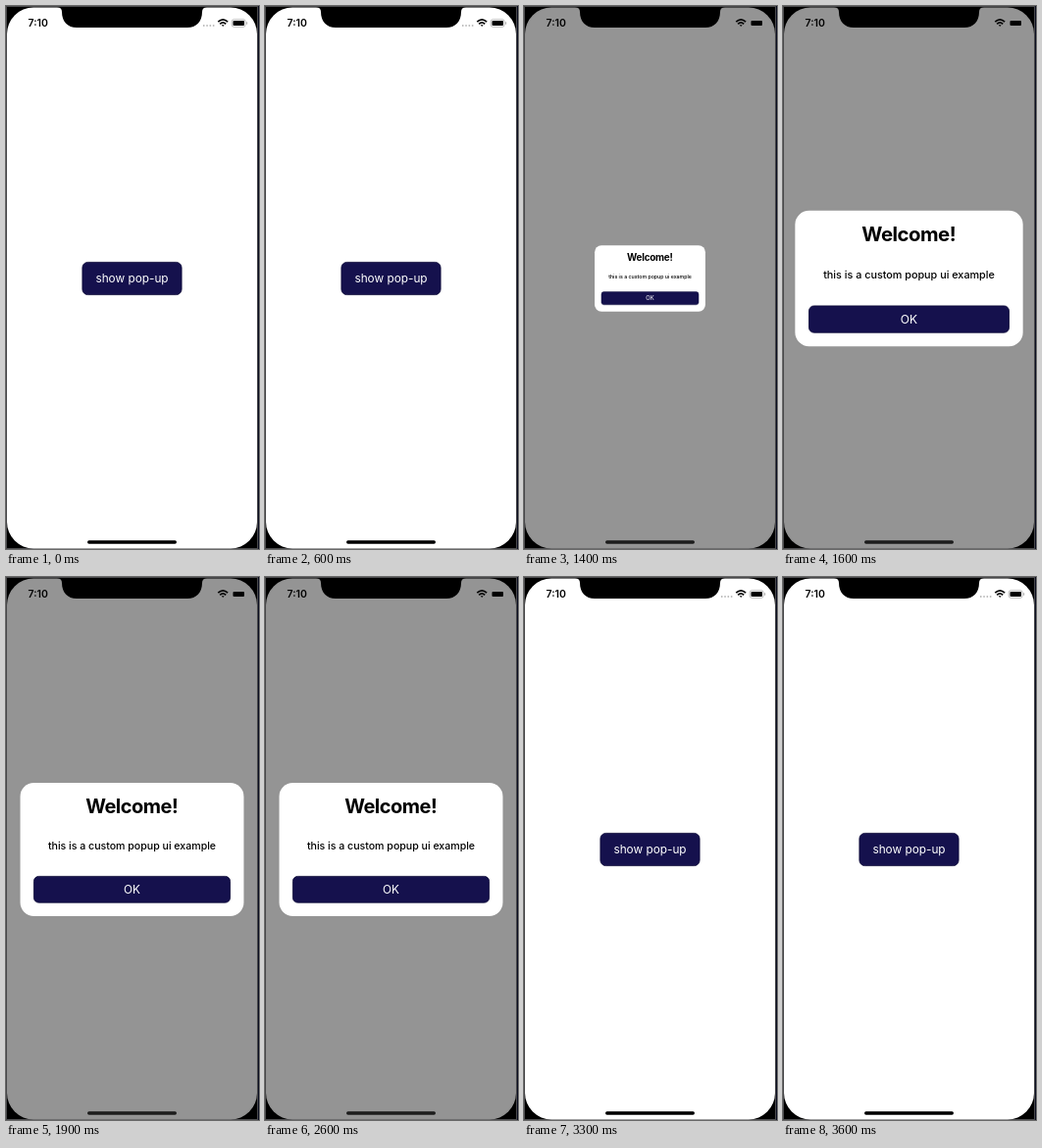
Animation, 258 px wide and 554 px high, one loop 4000 ms. Source, as an HTML page:

```html
<!DOCTYPE html>
<html lang="en">
<head>
<meta charset="utf-8">
<title>Pop-up demo</title>
<style>
  html, body { margin: 0; width: 100%; height: 100%; overflow: hidden; background: #000; }
  svg { display: block; width: 100%; height: 100%; }
  text { font-family: Inter, "Noto Sans", sans-serif; text-anchor: middle; }
  .button { fill: #15114d; stroke: #0b0835; stroke-width: .8; }
  .label { fill: #fff; font-size: 11.8px; }
</style>
</head>
<body>
<svg viewBox="0 0 258 554">
  <!-- device frame and screen -->
  <rect width="258" height="554" fill="#0a0d20"/>
  <rect x=".5" y=".5" width="256" height="553" fill="#000" stroke="#4a4a4c"/>
  <rect id="screen" x="1" y="1.5" width="255" height="552" rx="27"/>

  <g id="home">
    <rect class="button" x="77.9" y="261.4" width="101.2" height="33.2" rx="5.5"/>
    <text class="label" x="128.5" y="282">show pop-up</text>
  </g>

  <!-- notch, status bar and home indicator -->
  <path d="M52 1H205Q200 1.5 200 6C200 16 194 22 185 22H72C63 22 57 16 57 6Q57 1.5 52 1Z"/>
  <text x="32.7" y="21.3" font-size="10.4" font-weight="600">7:10</text>
  <g fill="none" stroke="#000" stroke-width="1.7">
    <path d="M216.3 16.2Q221.2 11.4 226.1 16.2M218.2 18.4Q221.2 15.4 224.2 18.4"/>
    <path d="M219.8 19.2H222.6L221.2 20.9Z" fill="#000" stroke="none"/>
  </g>
  <rect x="231.5" y="15" width="11.5" height="5" rx="1"/>
  <g id="faint" fill="none" stroke="#aaa">
    <path d="M201 20H213" stroke-width="1.3" stroke-dasharray="1.5 1.8"/>
    <rect x="230.2" y="13.7" width="14" height="7.6" rx="2.2" stroke-width=".8"/>
    <path d="M245.7 16.3V18.7"/>
  </g>
  <rect id="indicator" x="83" y="545.3" width="91" height="3.4" rx="1.7"/>

  <g id="popup">
    <rect x="14.5" y="210" width="228" height="136" rx="14" fill="#fff"/>
    <text x="128.2" y="241" font-size="20" font-weight="700" letter-spacing="-.5">Welcome!</text>
    <text x="128.5" y="278.3" font-size="10.6" font-weight="500">this is a custom popup ui example</text>
    <rect class="button" x="28.4" y="305.4" width="200.2" height="26.8" rx="5"/>
    <text class="label" x="128.5" y="323.2">OK</text>
  </g>
</svg>
<script>
  const LOOP = 4000, STEP = 100;
  const OPEN_AT = 1303, CLOSE_AT = 2969, CLOSE_MS = 300;
  const SHOWN_FROM = 1400, SHOWN_TO = 3300;
  const [screenRect, home, faint, indicator, popup] =
    ["screen", "home", "faint", "indicator", "popup"].map(id => document.getElementById(id));

  // Underdamped spring from 0 to 1.
  function spring(seconds) {
    const omega = 15.17, zeta = 0.773;
    const decay = zeta * omega, freq = omega * Math.sqrt(1 - zeta * zeta);
    const phase = freq * seconds;
    return 1 - Math.exp(-decay * seconds) * (Math.cos(phase) + decay / freq * Math.sin(phase));
  }

  // cubic-bezier(.42, 0, 1, 1), solved by bisection.
  function easeIn(x) {
    let low = 0, high = 1;
    for (let i = 0; i < 24; i++) {
      const s = (low + high) / 2, r = 1 - s;
      if (1.26 * r * r * s + 3 * r * s * s + s ** 3 < x) low = s; else high = s;
    }
    return low * low * (3 - 2 * low);
  }

  const easeInOut = p => p < 0.5 ? easeIn(2 * p) / 2 : 1 - easeIn(2 - 2 * p) / 2;

  function popupScale(time) {
    const closing = Math.min(1, Math.max(0, (time - CLOSE_AT) / CLOSE_MS));
    return spring((time - OPEN_AT) / 1000) * (1 - easeInOut(closing));
  }

  const show = (node, visible) => node.setAttribute("visibility", visible ? "visible" : "hidden");

  function draw(now) {
    const time = Math.floor(now % LOOP / STEP) * STEP;
    const open = time >= SHOWN_FROM && time < SHOWN_TO;
    screenRect.setAttribute("fill", open ? "#949494" : "#fff");
    indicator.setAttribute("fill", open ? "#1c1c1c" : "#000");
    show(home, !open);
    show(faint, !open);
    show(popup, open);
    if (open) {
      popup.setAttribute("transform",
        `translate(128.5 278) scale(${popupScale(time)}) translate(-128.5 -278)`);
    }
  }

  const start = performance.now();
  function tick() {
    draw(performance.now() - start);
    requestAnimationFrame(tick);
  }
  tick();
</script>
</body>
</html>
```
